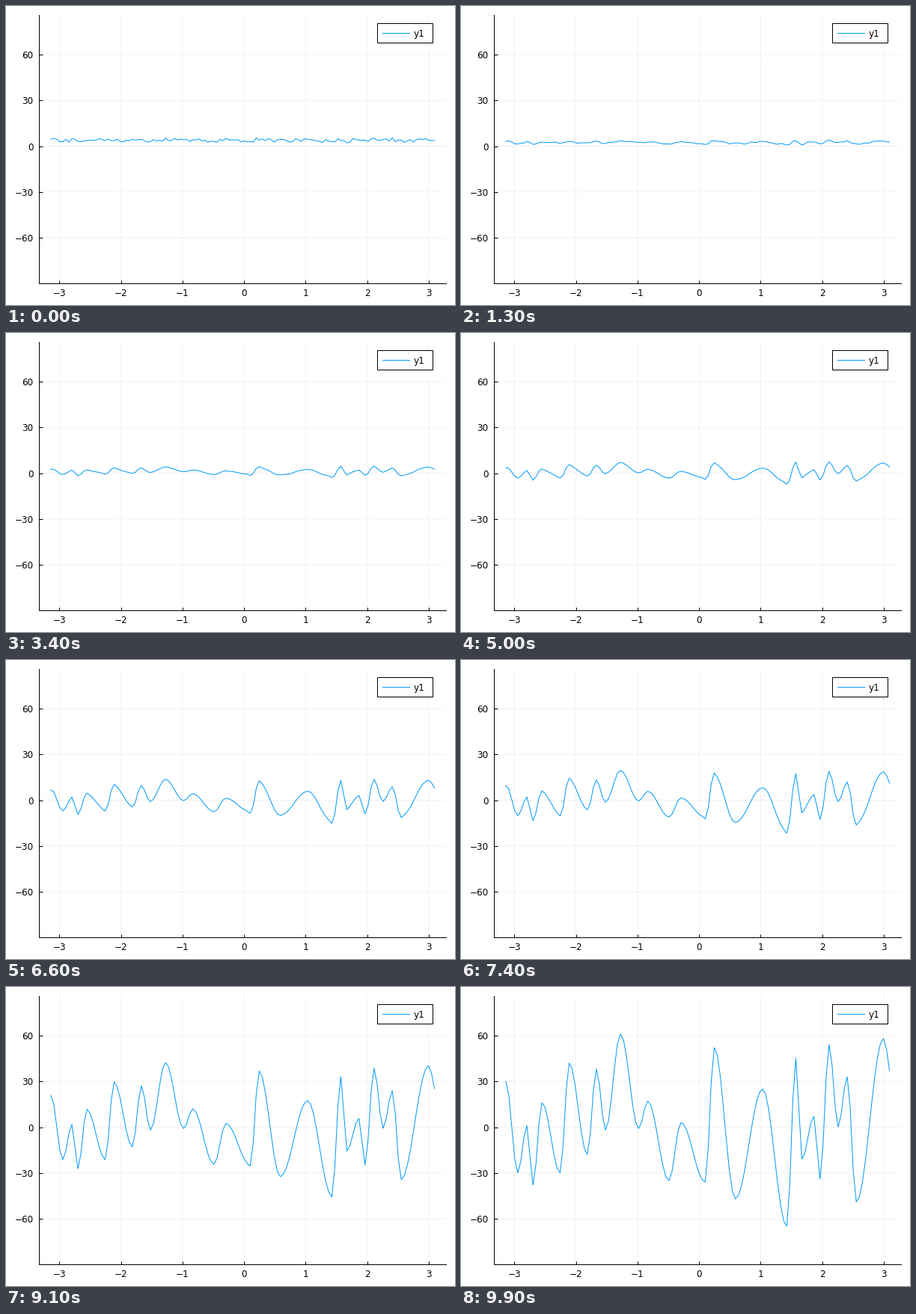
Recreate the animation shown at these times as a matplotlib script. Size 600 by 400 pixels, loop 10000 ms.

```python
import numpy as np
import matplotlib.pyplot as plt
from matplotlib.animation import FuncAnimation
from matplotlib.patches import Rectangle

W, H, DPI = 600, 400, 100
PX = 72 / DPI
FRAMES, STEP_MS = 100, 100
T_END = (FRAMES - 1) * STEP_MS / 1000
N = 128
BLUE = "#009afa"

plt.rcParams["font.family"] = "DejaVu Sans"
plt.rcParams["font.size"] = 12 * PX

# Main turning points (grid index, height) of the wave at the end of the loop
TURNS = [
    (0, 30), (4, -30), (7, 1), (9, -38), (12, 16), (18, -30), (21, 42), (27, -18),
    (30, 38), (33, -2), (38, 61), (44, -1), (47, 17), (54, -35), (58, 3), (66, -36),
    (69, 52), (76, -47), (85, 25), (93, -65), (96, 45), (98, -21), (102, 7),
    (104, -34), (107, 54), (110, 0), (113, 33), (116, -49), (125, 58), (N, 30),
]


def ease_through(points, n):
    """Cosine easing from each turning point to the next."""
    at, height = np.array(points).T
    i = np.arange(n)
    seg = np.searchsorted(at, i, side="right") - 1
    u = (i - at[seg]) / (at[seg + 1] - at[seg])
    return height[seg] + (height[seg + 1] - height[seg]) * (1 - np.cos(np.pi * u)) / 2


x = -np.pi + 2 * np.pi * np.arange(N) / N
k = np.arange(N // 2 + 1)

# Wave modes grow while the uniform level and the initial noise fade
growth = np.maximum(0.47 - 0.00015 * k**2, 0.34)
decay = 0.37 + 0.0002 * k**2
wave_hat = np.fft.rfft(ease_through(TURNS, N))
noise_hat = np.fft.rfft(np.random.default_rng(7).uniform(-1.2, 1.2, N))
noise_hat[0] = 0


def field(t):
    modes = wave_hat * np.exp(growth * (t - T_END)) + noise_hat * np.exp(-decay * t)
    return 3.9 * np.exp(-0.37 * t) + np.fft.irfft(modes, N)


# Plot area in stage pixels
L, R, T, B = 44.4, 588, 12, 371.4

fig = plt.figure(figsize=(W / DPI, H / DPI), dpi=DPI, facecolor="white")
ax = fig.add_axes([L / W, 1 - B / H, (R - L) / W, (B - T) / H])
ax.set_xlim(-3.3286, 3.2795)
ax.set_ylim(-90, 86)
ax.set_xticks(range(-3, 4))
ax.set_yticks(range(-60, 61, 30))
ax.set_axisbelow(True)
ax.grid(color="black", alpha=0.1, lw=PX / 2, snap=False)
ax.spines[["top", "right"]].set_visible(False)
ax.spines[["left", "bottom"]].set_linewidth(PX)
ax.tick_params(direction="in", length=4.5 * PX, width=PX)
ax.tick_params(axis="x", pad=7 * PX)
ax.tick_params(axis="y", pad=8 * PX)

(curve,) = ax.plot(x, field(0), color=BLUE, lw=PX)

# Legend, laid out in stage pixels
key = fig.add_axes([0, 0, 1, 1], facecolor="none")
key.set_xlim(0, W)
key.set_ylim(H, 0)
key.axis("off")
key.add_patch(Rectangle((496.2, 23.2), 74, 26, fc="white", ec="black", lw=PX))
key.plot([502.5, 538.5], [36.2, 36.2], color=BLUE, lw=PX)
key.text(544.5, 41, "y1", va="baseline")


def draw(i):
    curve.set_ydata(field(i * STEP_MS / 1000))
    return (curve,)


anim = FuncAnimation(fig, draw, frames=FRAMES, interval=STEP_MS, repeat=True, repeat_delay=0)
plt.show()
```
